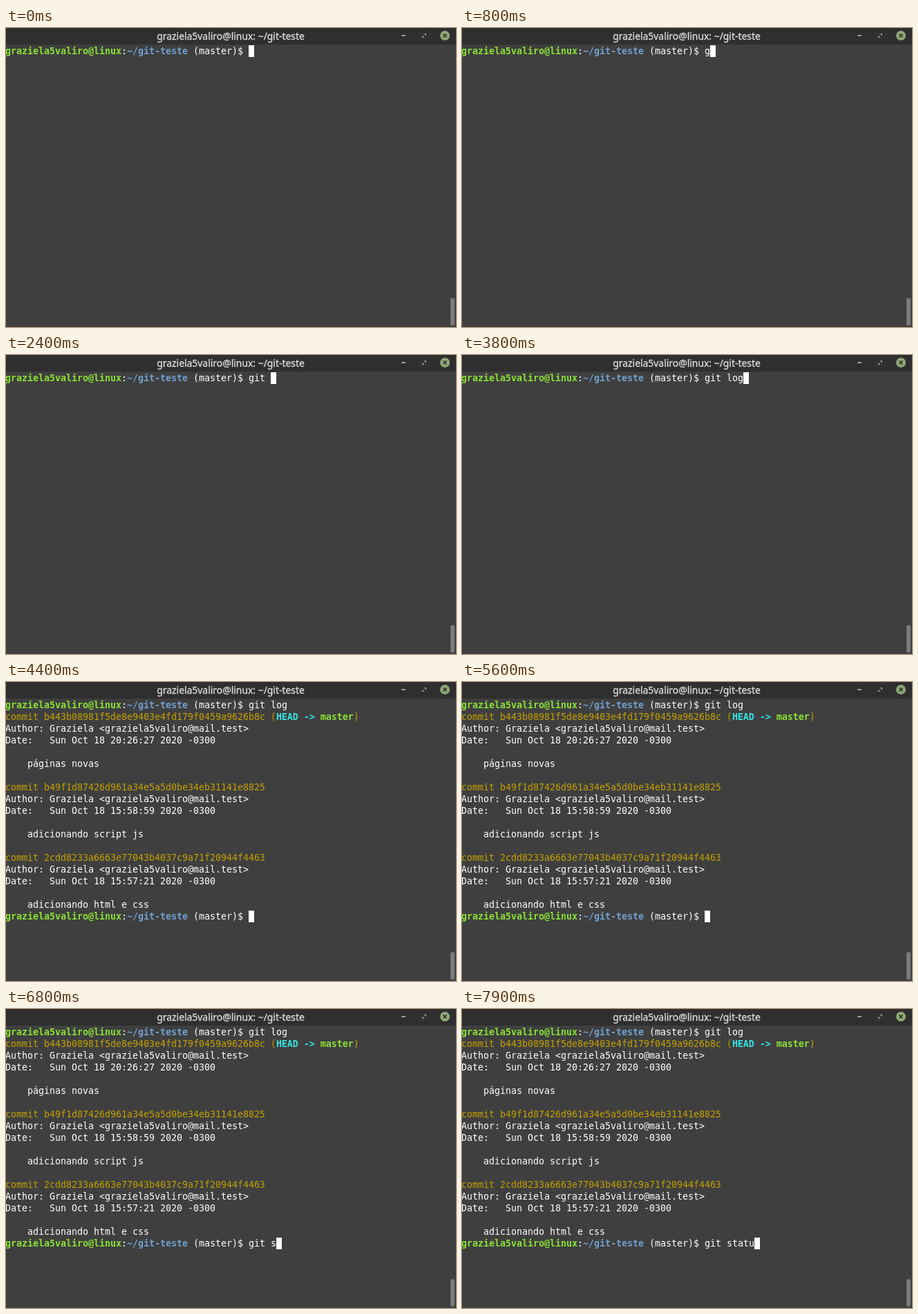
Write an HTML page that moves like this. It is 651 by 433 pixels and loops after 8000 ms.

```html
<!DOCTYPE html>
<html lang="pt">
<head>
<meta charset="utf-8">
<title>Terminal</title>
<style>
  html, body { margin: 0; width: 100%; height: 100%; overflow: hidden; background: #3f3f3f; }
  svg { display: block; width: 100%; height: 100%; }
  text { white-space: pre; }
  #screen text { font: 13.333px "DejaVu Sans Mono", monospace; letter-spacing: -0.027px; fill: #fff; }
  .title { font: 13.9px "Noto Sans", sans-serif; fill: #dadada; stroke: #dadada; stroke-width: 0.35px; }
  #screen .user { fill: #8ae234; font-weight: bold; }
  #screen .path { fill: #729fcf; font-weight: bold; }
  #screen .head { fill: #34e2e2; font-weight: bold; }
  #screen .hash { fill: #c4a000; }
</style>
</head>
<body>
<svg viewBox="0 0 651 433">
  <rect width="651" height="433" fill="#3f3f3f"/>
  <rect width="651" height="24" fill="#2f2f2f"/>
  <text class="title" id="title" x="325" y="17" text-anchor="middle"></text>
  <path d="M572 11h6" stroke="#9a9a9a" stroke-width="2"/>
  <path d="M604.5 8h3.5v3.5zM602 10.5v3.5h3.5z" fill="#9a9a9a"/>
  <circle cx="635" cy="11" r="7" fill="#8fa876"/>
  <path d="M632.5 8.5l5 5m0-5l-5 5" stroke="#2f2f2f" stroke-width="1.7"/>
  <rect x="643" y="391" width="6" height="40" rx="3" fill="#7b7b7b"/>
  <g id="screen"></g>
  <rect id="cursor" width="8" height="17" fill="#fff"/>
</svg>
<script>
const LOOP = 8000, CELL = 8, LINE = 17, LEFT = -1, TOP = 25, PROMPT = 44;
const user = "graziela5valiro", name = "Graziela", host = user + "@linux", dir = "~/git-teste";
const $ = id => document.getElementById(id);
const screen = $("screen"), cursor = $("cursor");

$("title").textContent = `${host}: ${dir}`;

// Each part is plain text or [class, text].
function addLine(row, ...parts) {
  const line = document.createElementNS(screen.namespaceURI, "text");
  line.setAttribute("x", LEFT);
  line.setAttribute("y", TOP + row * LINE + 13);
  for (const part of parts) {
    const [cls, text] = Array.isArray(part) ? part : ["", part];
    const span = document.createElementNS(screen.namespaceURI, "tspan");
    span.setAttribute("class", cls);
    span.textContent = text;
    line.append(span);
  }
  screen.append(line);
  return line;
}

function addPrompt(row) {
  const line = addLine(row, ["user", host], ":", ["path", dir], " (master)$ ", "");
  return { line, row, input: line.lastChild };
}

function addCommit(row, hash, date, message, ...refs) {
  return [
    addLine(row, ["hash", "commit " + hash], ...refs),
    addLine(row + 1, `Author: ${name} <${user}@mail.test>`),
    addLine(row + 2, `Date:   Sun Oct 18 ${date} 2020 -0300`),
    addLine(row + 4, "    " + message)
  ];
}

const first = addPrompt(0), second = addPrompt(18);
const output = [
  ...addCommit(1, "b443b08981f5de8e9403e4fd179f0459a9626b8c", "20:26:27", "páginas novas",
    ["hash", " ("], ["head", "HEAD -> "], ["user", "master"], ["hash", ")"]),
  ...addCommit(7, "b49f1d87426d961a34e5a5d0be34eb31141e8825", "15:58:59", "adicionando script js"),
  ...addCommit(13, "2cdd8233a6663e77043b4037c9a71f20944f4463", "15:57:21", "adicionando html e css"),
  second.line
];

const logKeys = [800, 900, 1000, 1200, 3300, 3500, 3800];
const statusKeys = [6000, 6200, 6300, 6400, 6800, 7000, 7200, 7600, 7900];
const enter = 4400;
const hidden = [[400, 700], [1800, 2400], [3000, 3300], [5000, 5600]];

const typed = (text, keys, t) => text.slice(0, keys.filter(k => k <= t).length);

function draw(t) {
  const done = t >= enter;
  const active = done ? second : first;
  first.input.textContent = typed("git log", logKeys, t);
  second.input.textContent = typed("git statu", statusKeys, t);
  for (const line of output) line.setAttribute("visibility", done ? "visible" : "hidden");
  cursor.setAttribute("x", LEFT + (PROMPT + active.input.textContent.length) * CELL);
  cursor.setAttribute("y", TOP + active.row * LINE);
  const off = hidden.some(([from, to]) => t >= from && t < to);
  cursor.setAttribute("visibility", off ? "hidden" : "visible");
}

const start = performance.now();
function tick() {
  draw((performance.now() - start) % LOOP);
  requestAnimationFrame(tick);
}
tick();
</script>
</body>
</html>
```
